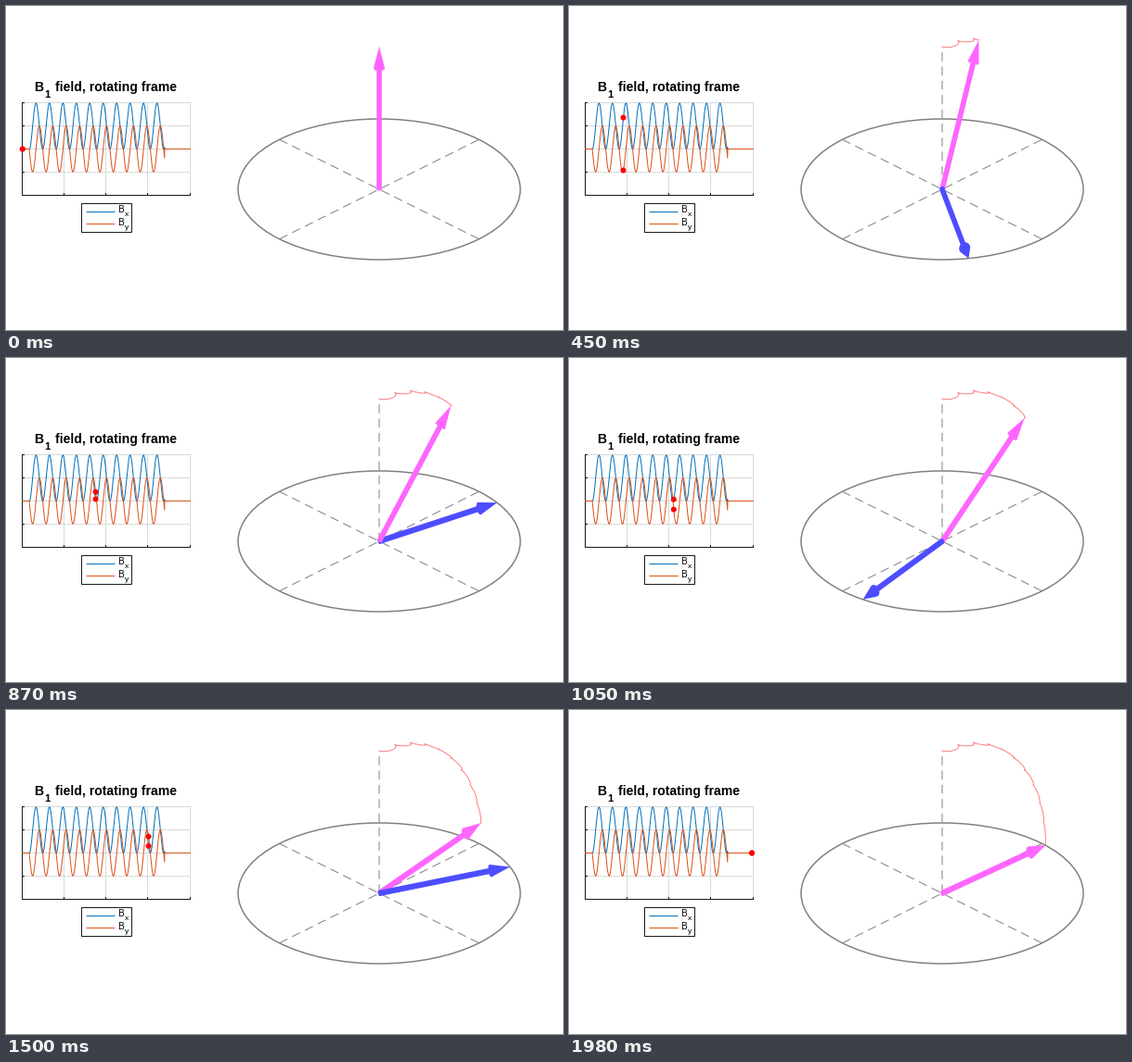
Write a matplotlib script that moves like this. It is 600 px wide and 350 px high and loops after 2010 ms.

```python
import numpy as np
import matplotlib.pyplot as plt
from matplotlib.animation import FuncAnimation
from matplotlib.patches import Circle, Ellipse, Polygon, Rectangle

plt.rcParams["path.snap"] = False    # keep half-pixel positions exact

W, H, DPI = 600, 350, 100
FRAMES, STEP_MS = 67, 30
PT = 72 / DPI                        # points per pixel

START, STOP = 2.68, 56.36            # pulse limits, in frames
CYCLES = 0.1875                      # field cycles per frame
GAIN = 0.025                         # spin rotation per radian of field phase
SUB = 24                             # integration steps per frame

CENTER = np.array([402.0, 198.0])
RX, RY, RZ = 152.0, 76.0, 154.0
GRAY, PALE, DARK = (0.5, 0.5, 0.5), (0.85, 0.85, 0.85), "#1a1a1a"
BLUE, ORANGE = "#0072BD", "#D95319"
PINK, VIOLET = (1, 0.4, 1), (0.3, 0.3, 1)


def field(n):
    """Transverse field (Bx, By) at frame time n, zero outside the pulse."""
    n = np.asarray(n, float)
    phase = 2 * np.pi * CYCLES * (n - START)
    on = (n >= START) & (n <= STOP)
    return np.where(on, 1 - np.cos(phase), 0), np.where(on, -np.sin(phase), 0)


def project(p):
    x, y, z = np.asarray(p, float).T
    c = np.sqrt(0.5)
    return np.column_stack([CENTER[0] + RX * c * (x + y),
                            CENTER[1] + RY * c * (x - y) - RZ * z])


def precess():
    """Integrate dM/dt = M x B from the z axis."""
    m = np.array([0.0, 0.0, 1.0])
    path = [m]
    rate = GAIN * 2 * np.pi * CYCLES / SUB
    for k in range((FRAMES - 1) * SUB):
        bx, by = field((k + 0.5) / SUB)
        b = np.array([bx, by, 0.0])
        size = np.linalg.norm(b)
        if size > 0:
            a, u = -rate * size, b / size
            m = (m * np.cos(a) + np.cross(u, m) * np.sin(a)
                 + u * (u @ m) * (1 - np.cos(a)))
        path.append(m)
    return np.array(path)


def hull(points):
    pts = sorted(map(tuple, points))

    def chain(seq):
        out = []
        for p in seq:
            while len(out) > 1 and (
                    (out[-1][0] - out[-2][0]) * (p[1] - out[-2][1])
                    - (out[-1][1] - out[-2][1]) * (p[0] - out[-2][0])) <= 0:
                out.pop()
            out.append(p)
        return out[:-1]

    return np.array(chain(pts) + chain(pts[::-1]))


def ring(d, along, radius):
    side = np.cross(d, [0, 0, 1] if abs(d[2]) < 0.9 else [1, 0, 0])
    side = side / np.linalg.norm(side)
    up = np.cross(d, side)
    a = np.linspace(0, 2 * np.pi, 32, endpoint=False)[:, None]
    return along * d + radius * (np.cos(a) * side + np.sin(a) * up)


class Arrow:
    STEM, HEAD, HEAD_LEN = 0.0185, 0.04, 0.15

    def __init__(self, ax, color):
        self.parts = [Polygon(np.zeros((3, 2)), fc=color, ec="none")
                      for _ in range(2)]
        for p in self.parts:
            ax.add_patch(p)

    def point(self, d):
        neck = 1 - self.HEAD_LEN
        stem = np.vstack([ring(d, 0, self.STEM), ring(d, neck, self.STEM)])
        head = np.vstack([ring(d, neck, self.HEAD), d])
        near = (d[0] - d[1]) * np.sqrt(0.375) + d[2] * 0.5
        for part, solid in zip(self.parts, (stem, head)):
            part.set_xy(hull(project(solid)))
            part.set_zorder(10 + near)
            part.set_visible(True)

    def hide(self):
        for part in self.parts:
            part.set_visible(False)


fig = plt.figure(figsize=(W / DPI, H / DPI), dpi=DPI, facecolor="white")
ax = fig.add_axes([0, 0, 1, 1])
ax.set_xlim(0, W)
ax.set_ylim(H, 0)
ax.axis("off")


def line(x, y, color, width=1.0, **kw):
    return ax.plot(x, y, color=color, lw=width * PT, **kw)[0]


def label(x, y, text, px, **kw):
    ax.text(x, y, text, fontsize=px * PT, family="Liberation Sans",
            ha="left", va="baseline", color="black", **kw)


# Field plot
LEFT, RIGHT, TOP, BOTTOM, ZERO, AMP = 17.5, 198.5, 104.5, 204.5, 154.5, 24.8


def plot_x(n):
    return 17.8 + 2.715 * n


for gx in (62.5, 107.5, 152.5, 198.5):
    line([gx, gx], [TOP, BOTTOM], PALE, zorder=1)
    line([gx, gx], [BOTTOM, BOTTOM - 2], DARK, zorder=2)
for gy in (104.5, 129.5, 154.5, 179.5):
    line([LEFT, RIGHT], [gy, gy], PALE, zorder=1)
    line([LEFT, LEFT + 2], [gy, gy], DARK, zorder=2)
line([LEFT, LEFT, RIGHT], [TOP, BOTTOM, BOTTOM], DARK, zorder=2)

times = np.linspace(0, FRAMES - 0.5, 2400)
for b, color in zip(field(times), (BLUE, ORANGE)):
    line(plot_x(times), ZERO - AMP * b, color, zorder=3)

label(30.5, 92, "B", 14, weight="bold")
label(41.3, 99, "1", 11.2, weight="bold")
label(52.8, 92, "field, rotating frame", 14, weight="bold")

# Legend
ax.add_patch(Rectangle((81.5, 213.5), 54, 31, fc="white", ec=DARK,
                       lw=PT, zorder=2))
for y, base, sub, color in ((222.5, 223, "x", BLUE),
                            (235.5, 237, "y", ORANGE)):
    line([87, 117], [y, y], color, zorder=3)
    label(120.5, base, "B", 10, zorder=3)
    label(127.5, base + 4, sub, 8.5, zorder=3)

# Transverse plane and axes
ax.add_patch(Ellipse(CENTER, 2 * RX, 2 * RY, fc="none", ec=GRAY,
                     lw=1.5 * PT, zorder=3))
for ends in ([[-1, 0, 0], [1, 0, 0]], [[0, -1, 0], [0, 1, 0]],
             [[0, 0, 0], [0, 0, 1]]):
    line(*project(ends).T, GRAY, zorder=3, dash_capstyle="butt",
         linestyle=(0, (9.6, 5.76)))

path = precess()
trace = project(path)
trail = line([], [], (1, 0.5, 0.5), zorder=4)
dots = [ax.add_patch(Circle((0, 0), 3, fc="red", ec="none", zorder=5))
        for _ in range(2)]
spin, drive = Arrow(ax, PINK), Arrow(ax, VIOLET)


def update(n):
    bx, by = field(n)
    for dot, b in zip(dots, (bx, by)):
        dot.center = plot_x(n), ZERO - AMP * b
    trail.set_data(*trace[:n * SUB + 1].T)
    spin.point(path[n * SUB])
    size = np.hypot(bx, by)
    if size > 0:
        drive.point(np.array([bx, by, 0]) / size)
    else:
        drive.hide()
    return [*dots, trail, *spin.parts, *drive.parts]


anim = FuncAnimation(fig, update, frames=FRAMES, interval=STEP_MS,
                     repeat=True, repeat_delay=0, blit=False)
plt.show()
```
